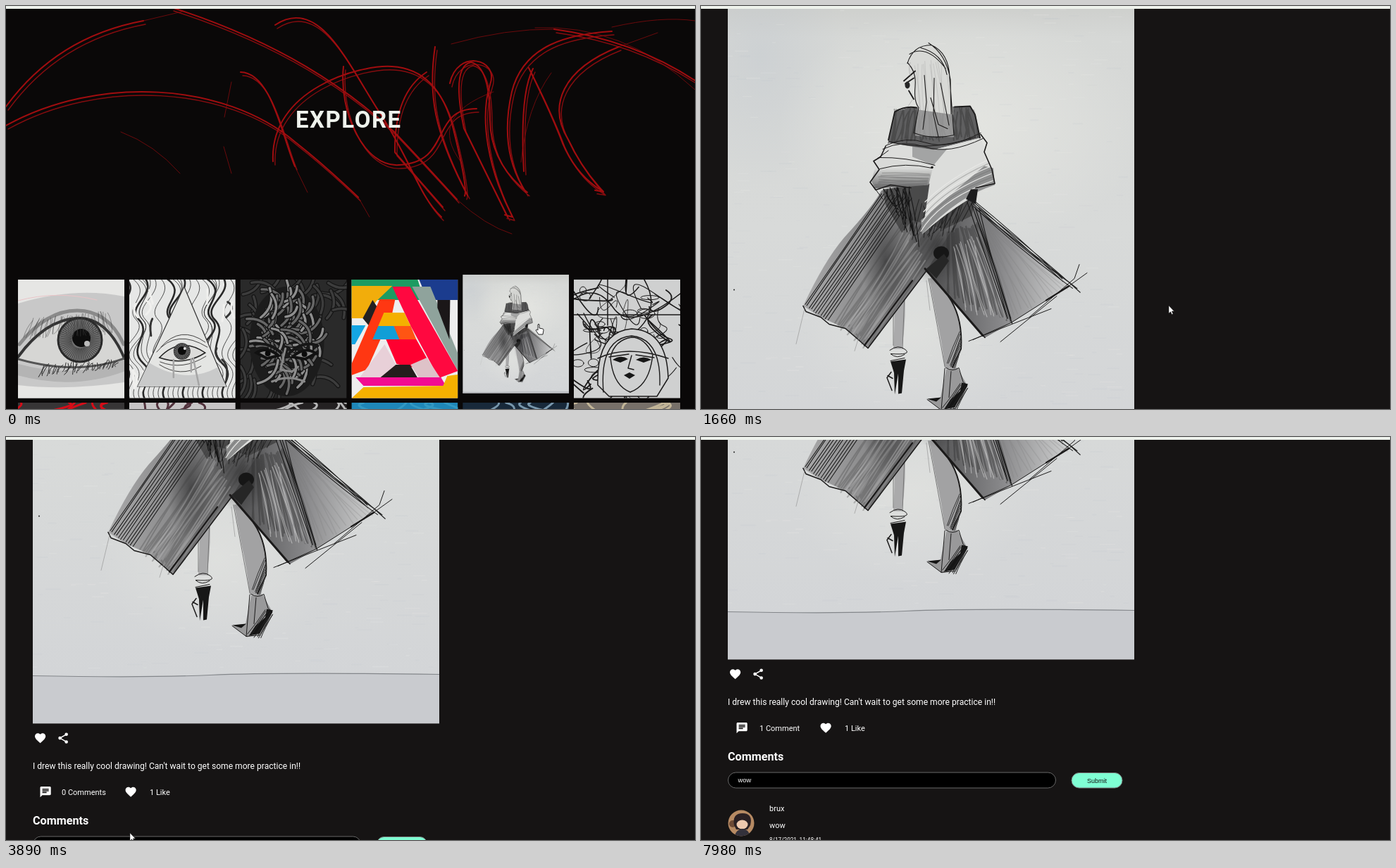
These frames come from a looping animation (978x573 px, 8.11 s). An HTML page:

```html
<!DOCTYPE html>
<html lang="en">
<head>
<meta charset="utf-8">
<title>Art community</title>
<style>
  html, body { margin: 0; width: 100%; height: 100%; overflow: hidden; background: #161414; }
  #stage { display: block; width: 978px; height: 573px; font: 11px Roboto, sans-serif; fill: #fff; }
  .line { fill: none; stroke: #1b1a1a; stroke-linecap: round; stroke-linejoin: round; }
  .field { fill: #000; stroke: #686868; }
  .arial { font-family: "Liberation Sans", Arial, sans-serif; }
</style>
</head>
<body>
<svg id="stage" viewBox="0 0 978 573">
  <defs>
    <linearGradient id="paper" x2="0" y2="1">
      <stop stop-color="#b5b6b3"/><stop offset=".05" stop-color="#c8c9c6"/>
      <stop offset=".15" stop-color="#d6d8d6"/><stop offset=".5" stop-color="#d8dad9"/>
      <stop offset="1" stop-color="#d2d4d7"/>
    </linearGradient>
    <radialGradient id="glow"><stop stop-color="#e4e5e1"/><stop offset="1" stop-color="#e4e5e1" stop-opacity="0"/></radialGradient>
    <radialGradient id="haze"><stop stop-color="#bcc3cc"/><stop offset="1" stop-color="#bcc3cc" stop-opacity="0"/></radialGradient>
    <radialGradient id="smudge"><stop stop-color="#2c2c2d"/><stop offset="1" stop-color="#2c2c2d" stop-opacity="0"/></radialGradient>
    <linearGradient id="skirt"><stop stop-color="#a9a9aa"/><stop offset=".45" stop-color="#707071"/><stop offset="1" stop-color="#98989a"/></linearGradient>
    <linearGradient id="panel"><stop stop-color="#4c4c4d"/><stop offset=".5" stop-color="#858587"/><stop offset="1" stop-color="#d0d1d1"/></linearGradient>
    <linearGradient id="sleeve" x2="0" y2="1"><stop offset=".3" stop-color="#d9dad8"/><stop offset="1" stop-color="#6f6f70"/></linearGradient>
    <clipPath id="sheet"><rect x="38" y="87" width="577" height="769"/></clipPath>
    <clipPath id="disc"><circle r="18.5"/></clipPath>
    <g id="art" clip-path="url(#sheet)"></g>
    <g id="portrait" clip-path="url(#disc)">
      <path d="M-19-19H19V19H-19z" fill="#b68a63"/>
      <circle cx="-12" cy="1" r="5" fill="#6d4a35"/>
      <path d="M-10 3Q-13-14 2-14T13 3L9 9H-7z" fill="#2a2023"/>
      <ellipse cx="1.5" cy="2" rx="8" ry="6.5" fill="#eec9ae"/>
      <path d="M-8-1Q1-11 11-1L8-7H-5z" fill="#2a2023"/>
      <path d="M-10 19Q-6 8 2 8T13 19z" fill="#33313b"/>
    </g>
    <g id="landscape" clip-path="url(#disc)">
      <path d="M-19-19H19V19H-19z" fill="#1d2a36"/>
      <path d="M-19-9L18-17L12 0L-1 7L-19 4z" fill="#8fa3b3"/>
      <path d="M-19-3L10-10L9 1L-19 6z" fill="#d3dade"/>
      <path d="M-19 5L0 7L19-3V19H-19z" fill="#080909"/>
      <path d="M-1 8L1 0L3 8z" fill="#111"/>
    </g>
    <path id="heart" d="M12 21.35l-1.45-1.32C5.4 15.36 2 12.28 2 8.5 2 5.42 4.42 3 7.5 3c1.74 0 3.41.81 4.5 2.09C13.09 3.81 14.76 3 16.5 3 19.58 3 22 5.42 22 8.5c0 3.78-3.4 6.86-8.55 11.54z"/>
    <path id="chat" d="M20 2H4c-1.1 0-2 .9-2 2v18l4-4h14c1.1 0 2-.9 2-2V4c0-1.1-.9-2-2-2zM6 9h12v2H6zm8 5H6v-2h8zm4-6H6V6h12z"/>
    <g id="share"><path d="M18 5L6 12L18 19" fill="none" stroke="#fff" stroke-width="2"/><circle cx="18" cy="5" r="3"/><circle cx="6" cy="12" r="3"/><circle cx="18" cy="19" r="3"/></g>
    <g id="bubbles"><circle cx="7.2" cy="14.4" r="3.2"/><circle cx="14.8" cy="18" r="2"/><circle cx="15.2" cy="8.8" r="4.8"/></g>
    <path id="compass" fill-rule="evenodd" d="M12 2a10 10 0 100 20a10 10 0 100-20zm2.2 12.2L6 18l3.8-8.2L18 6zM12 10.9a1.1 1.1 0 100 2.2a1.1 1.1 0 100-2.2z"/>
    <path id="school" d="M5 13.18v4L12 21l7-3.82v-4L12 17zM12 3L1 9l11 6 9-4.91V17h2V9z"/>
    <g id="cart"><circle cx="7" cy="20" r="2"/><circle cx="17" cy="20" r="2"/><path d="M1 2v2h2l3.6 7.6-1.4 2.4C4.5 15.5 5.5 17 7 17h12v-2H7.4l1-2h7.2c.7 0 1.4-.4 1.700-1L21 5.500C21.300 4.800 20.800 4 20 4H5.200l-.9-2z"/></g>
    <path id="forum" d="M21 6h-2v9H6v2c0 .55.45 1 1 1h11l4 4V7c0-.55-.45-1-1-1zm-4 6V3c0-.55-.45-1-1-1H3c-.55 0-1 .45-1 1v14l4-4h10c.55 0 1-.45 1-1z"/>
  </defs>

  <g id="explore"></g>

  <g id="post">
    <rect width="978" height="1300" fill="#161414"/>
    <rect y="46" width="978" height="37" fill="#000"/>
    <circle cx="29.5" cy="23.5" r="9" fill="#7fffd4"/>
    <rect class="field" x="63" y="14.5" width="404" height="21.5" rx="10.75"/>
    <text x="83" y="28.5" font-size="10.2" fill="#7d7d7d">Search Image Posts...</text>
    <use href="#portrait" transform="translate(761.5 25) scale(.56)"/>
    <text x="777" y="29">Profile</text>
    <text x="878" y="28">Sign out</text>
    <g id="nav"></g>
    <g id="body">
      <use href="#landscape" transform="translate(57 121) scale(1 .92)"/>
      <text x="88" y="115">TolSketch5081</text>
      <text x="38" y="173.5" font-size="12.2">Wandering Shadow</text>
      <use href="#art" y="112.5"/>
      <g id="like" transform="translate(39.5 980) scale(.76)"><use href="#heart"/></g>
      <use href="#share" transform="translate(72 980) scale(.76)"/>
      <text x="38" y="1033" font-size="12.1">I drew this really cool drawing! Can't wait to get some more practice in!!</text>
      <g id="comments"><use href="#chat" transform="translate(-9 -9) scale(.76)"/><text y="4"></text></g>
      <g id="likes"><use href="#heart" transform="translate(-9 -9) scale(.76)"/><text y="4"></text></g>
      <text x="38" y="1112" font-size="16.2" font-weight="700">Comments</text>
      <rect class="field" x="38.5" y="1129" width="465" height="22" rx="11"/>
      <text class="arial" x="52.5" y="1143" font-size="9.3">wow</text>
      <rect id="caret" x="71" y="1134" width="1" height="11"/>
      <rect x="526" y="1129.5" width="72" height="21.5" rx="10.75" fill="#7fffd4" stroke="#777"/>
      <text class="arial" x="548" y="1143.5" font-size="9" fill="#111">Submit</text>
      <use href="#portrait" transform="translate(57 1201)"/>
      <text x="97" y="1184">brux</text>
      <text x="97" y="1207.5">wow</text>
      <text x="97" y="1228" font-size="8.2">8/17/2021, 11:48:41</text>
    </g>
  </g>

  <rect width="978" height="4" fill="#eef2ec"/>
  <path id="arrow" d="M0 0V11L2.6 8.7L4.3 12.5L6 11.7L4.3 8H7.5z" stroke="#222" stroke-width=".5"/>
  <path id="hand" d="M-2 1Q-1-1 0 1V6L5 7Q6 7 6 9L5 15H-1L-5 9Q-4 7-2 9z" stroke="#111" stroke-width=".9"/>
</svg>
<script>
const LOOP = 8110;
const $ = id => document.getElementById(id);
let seed = 7;
const rand = () => (seed = seed * 16807 % 2147483647) / 2147483647;
const spread = (low, high) => low + (high - low) * rand();
const many = (n, make) => Array.from({ length: n }, (_, i) => make(i, n > 1 ? i / (n - 1) : 0)).join('');
const fill = (d, color, extra = '') => `<path d="${d}" fill="${color}" ${extra}/>`;
const ink = (d, width = 1, color = '#1b1a1a') => `<path class="line" d="${d}" style="stroke:${color};stroke-width:${width}"/>`;
const oval = (x, y, rx, ry, color, opacity = 1) =>
  `<ellipse cx="${x}" cy="${y}" rx="${rx}" ry="${ry}" fill="${color}" opacity="${opacity}"/>`;

// Strokes running from points on one segment to matching points on another.
function fan([ax, ay, bx, by], [cx, cy, dx, dy], n, color, width = 1, jitter = 2) {
  const wobble = () => spread(-jitter, jitter);
  return ink(many(n, (i, k) => {
    const x1 = ax + (bx - ax) * k + wobble(), y1 = ay + (by - ay) * k + wobble();
    const x2 = cx + (dx - cx) * k + wobble(), y2 = cy + (dy - cy) * k + wobble();
    return `M${x1} ${y1}Q${(x1 + x2) / 2 + wobble() * 2} ${(y1 + y2) / 2 + wobble() * 2} ${x2} ${y2}`;
  }), width, color);
}

function drawing() {
  const paper = fill('M38 87H615V856H38z', 'url(#paper)')
    + fill('M38 87H560Q300 98 38 140z', '#a5a6a2', 'opacity=".3"')
    + oval(85, 230, 120, 190, 'url(#haze)', .35)
    + oval(370, 330, 260, 170, 'url(#glow)')
    + oval(300, 620, 170, 130, 'url(#glow)', .6)
    + many(420, () => ink(`M${spread(30, 600)} ${spread(105, 780)}h${spread(3, 22)}`, spread(.8, 2), rand() < .55 ? '#eeefeb30' : '#bec4ca28'))
    + fill('M38 788Q200 791 290 787T615 786V856H38z', '#c6c9cd', 'opacity=".75"')
    + ink('M38 788Q200 791 290 787T615 786', 1.2, '#83868a')
    + oval(578, 128, 1, 1, '#222') + oval(47, 561, 1, 1, '#222');

  const legs = fill('M289 550Q292 600 285 645H273Q276 590 273 580z', '#aaaaab')
    + fill('M324 545L351 536Q354 570 362 593Q370 615 367 645L362 673H346Q343 640 334 600z', '#a2a2a3')
    + ink('M289 565L286 645M273 585V640M323 545Q337 620 346 670', 1, '#777')
    + ink('M351 570Q372 600 369 645L357 671', 2) + ink('M358 534L352 572')
    + fan([368, 620, 369, 645], [350, 665, 360, 674], 8, '#333', 1, 1)
    + ink('M268 647Q280 638 290 646T269 652Q278 660 289 653M269 662L289 658')
    + fill('M269 663L291 660L288 676L285 708L280 709V680L275 710L274 679z', '#171717')
    + ink('M270 678L264 686L271 704M265 683L272 687', 1.5)
    + fill('M348 674L364 672L378 697L363 728L342 733L321 717L340 714z', '#99999a')
    + ink('M346 673L341 732L321 717M348 672Q357 678 366 672L372 692L378 697L361 730L341 732M355 677L352 714')
    + fill('M379 695L360 728L345 731L354 717L368 705L370 693zM321 716L341 714L334 720z', '#151515')
    + fan([368, 695, 380, 701], [342, 730, 361, 735], 8, '#222', 1, 2);

  const skirt = fill('M256 420Q246 440 203 487Q175 520 145 584L170 600L205 616L237 644L320 534L403 629L440 608L523 555L390 442L375 412L300 410z', 'url(#skirt)')
    + fill('M380 437L523 555L440 608L403 629L320 534z', 'url(#panel)')
    + oval(262, 520, 34, 75, 'url(#smudge)', .65) + oval(335, 500, 45, 55, 'url(#smudge)', .7)
    + fill('M258 418L324 410L390 430L384 456L345 475L300 462L285 480L262 440z', '#3c3c3d', 'opacity=".75"')
    + fan([256, 425, 300, 430], [147, 582, 180, 604], 11, '#1e1e1e', 1.1, 1)
    + fan([300, 450, 340, 485], [195, 608, 238, 640], 24, '#3a3a3b48', 2, 6)
    + fan([290, 480, 318, 520], [205, 612, 240, 633], 12, '#d5d5d540', 2, 5)
    + fan([350, 480, 392, 470], [350, 565, 440, 605], 24, '#29292a60', 2.4, 4)
    + fan([358, 500, 390, 488], [372, 588, 430, 602], 12, '#e4e4e480', 1.2, 4)
    + fan([388, 448, 405, 465], [440, 600, 520, 557], 12, '#77777938', 1.5, 4)
    + fan([378, 436, 394, 446], [436, 600, 440, 607], 5, '#1f1f1f', 1.2, 2)
    + fan([383, 434, 392, 446], [510, 547, 540, 564], 6, '#222', 1.1, 3)
    + fan([262, 416, 300, 414], [275, 440, 305, 495], 18, '#161616', 1.1, 5)
    + fan([310, 440, 390, 425], [305, 490, 365, 470], 24, '#161616aa', 1.1, 7)
    + oval(341, 509, 11, 10, '#161616') + fill('M320 531L345 510L352 520L334 545z', '#262626')
    + ink('M145 584L149 592L170 600L182 610L205 616L220 629L237 644L320 534L403 629', 1.6)
    + ink('M318 531L400 626', 3)
    + ink('M386 632L440 608L523 555L548 537M380 634L497 588M466 600L530 545L537 525M425 635L505 570M492 575L520 556', 1)
    + ink('M490 576L522 556M232 640L300 548', 2.2)
    + ink('M147 588L135 638M225 625L218 648M320 548L325 590', .7, '#999');

  const top = fill('M275 308L295 302L382 300L389 312L396 345L330 362L265 354z', '#5f5f60')
    + fan([278, 308, 386, 304], [268, 350, 394, 343], 40, '#2525265a', 2, 4)
    + fill('M308 298H357L359 344L304 342z', '#b9b9b8', 'opacity=".65"')
    + fill('M267 352L246 376L251 391L240 408L248 419L325 406L314 482Q360 440 417 412L404 365L397 345L330 362z', '#dcdddb')
    + fill('M250 376Q280 374 329 388L323 412L298 414L247 417L242 407z', 'url(#sleeve)')
    + fill('M415 388L417 412Q365 428 314 482L312 462Q355 425 402 385z', '#8f9090')
    + fill('M300 356Q330 364 350 360L330 384L300 372z', '#6d6d6e', 'opacity=".5"')
    + fan([256, 395, 248, 414], [324, 398, 318, 411], 9, '#4e4e4f50', 1.6, 2)
    + many(7, i => ink(`M${312 + i} ${478 - i * 7}Q${340 + i * 2} ${432 - i * 5} ${414 - i} ${406 - i * 5}`, 1.2, i % 2 ? '#60616160' : '#e8e8e6'))
    + fill('M383 418L393 418L390 439L376 432z', '#1c1c1d')
    + ink('M275 308Q290 299 306 302M275 308L266 348M360 301L382 300L389 312L396 345', 1.8)
    + ink('M262 356Q290 342 320 352T397 338M258 361Q286 347 319 358T400 346M267 350Q320 366 390 344')
    + ink('M262 357L255 372L245 378L253 390L240 408L248 419L269 412L298 416M397 340L406 352L402 365L413 390L417 410L390 416', 1.6)
    + ink('M252 373Q290 372 332 384M254 389Q290 379 328 388M247 377L266 363M240 408L258 432')
    + oval(328, 387, 1.8, 1.8, '#1b1a1a');

  const head = fill('M294 239Q305 214 328 214Q350 223 354 260L358 312L309 305Z', '#d8d9d6')
    + fan([304, 240, 345, 235], [311, 342, 357, 340], 12, '#9a9a9a50', 1, 3)
    + ink('M293 239Q301 213 327 213Q352 224 353 260L359 341M293 238Q306 251 304 272T309 302L302 338M296 226Q320 211 347 246M323 210Q348 226 354 262L355 311M312 217Q343 225 349 255M317 256L320 294L315 333M331 260L330 312L337 344M340 267L352 327M326 288L337 326L350 332M302 338Q330 348 359 341', 1.1)
    + ink('M288 264L304 250M290 268L302 260M295 278L302 290', 1.8)
    + oval(293, 270, 3.5, 5, '#262626')
    + ink('M297 238Q294 247 297 256M300 291L294 300', .7, '#aaa');

  return paper + legs + skirt + top + head;
}

const tile = (x, y, content, box = '0 0 151 168.5') =>
  `<svg x="${x}" y="${y}" width="151" height="168.5" viewBox="${box}" preserveAspectRatio="xMidYMid slice">${content}</svg>`;
const ground = color => fill('M0 0H151V169H0z', color);
const spokes = (x, y, inner, outer, n, color) => ink(many(n, i => {
  const a = i / n * Math.PI * 2, c = Math.cos(a), s = Math.sin(a);
  return `M${x + c * inner} ${y + s * inner}L${x + c * outer} ${y + s * outer}`;
}), .7, color);

const pencilEye = () => ground('#c8c8c8') + fill('M0 0H151V24Q80 10 0 34zM0 150Q70 158 151 146V169H0z', '#e6e6e4')
  + ink('M0 30Q55 15 112 29', 1, '#e9c4c7')
  + ink('M0 128Q80 150 151 122', 16, '#b4b4b4')
  + fill('M0 114Q20 87 45 68Q85 45 117 64Q140 83 151 112Q90 132 0 114z', '#d6d6d4')
  + ink('M2 92Q40 44 84 44T150 92', 5, '#8a8a8a') + ink('M0 110Q38 58 82 55T151 112', 4, '#343434')
  + '<circle cx="88" cy="86" r="31" fill="#747474" stroke="#292929" stroke-width="3"/>' + spokes(88, 86, 12, 29, 60, '#292929')
  + oval(90, 83, 13, 13, '#0d0d0d') + oval(98, 91, 4, 4, '#bbb')
  + fan([8, 82, 135, 75], [20, 58, 128, 47], 40, '#4448', .9, 3) + ink('M0 113Q85 137 151 112', 3, '#555')
  + fan([36, 122, 145, 116], [30, 137, 140, 125], 33, '#2c2c2c', 1, 3);

const triangleEye = () => ground('#e6e7e6')
  + many(24, i => {
    const x = i * 7 - 8, sway = 14 * Math.sin(i * .9);
    return ink(`M${x} -5c${30 + sway} 24-${20 - sway} 42 ${sway} 62s-${24 + sway} 40 ${-sway} 62-14 34 6 56`, i % 4 ? .8 : 2.6, '#292929');
  })
  + many(16, i => ink(`M${i % 2 ? spread(0, 35) : spread(110, 150)} ${spread(0, 130)}q${spread(-14, 14)} 8 ${spread(-6, 6)} ${spread(15, 30)}`, 3, rand() < .5 ? '#333' : '#f0f0ee'))
  + fill('M78 10L12 152H138z', '#e4e5e3', 'stroke="#333" stroke-width="1.2"')
  + fill('M28 118L12 152H138L125 125Q80 150 28 118z', '#c9caca')
  + fill('M43 111Q72 80 108 104Q79 123 43 111z', '#dcdcda', 'stroke="#222" stroke-width="1.5"')
  + oval(75, 102, 12, 12, '#3a3a3a') + spokes(75, 102, 6, 11, 24, '#888') + oval(75, 101, 6, 6, '#0b0b0b') + oval(79, 98, 2, 2, '#ddd')
  + ink('M39 103Q67 69 111 96M45 96Q73 64 108 89M44 117Q76 130 109 109M43 121Q73 140 102 123', .8)
  + ink('M63 114V139M91 112L99 150M88 113V131', 2.5, '#a5a5a5');

const strand = (x, y, reach, color) => {
  const a = spread(0, Math.PI), dx = reach * Math.cos(a), dy = reach * Math.sin(a);
  const d = `M${x - dx} ${y - dy}Q${x + dy * .7} ${y - dx * .7} ${x + dx} ${y + dy}`;
  return ink(d, 6, '#151515') + ink(d, 3.4, color);
};
const wovenFace = () => ground('#2a2a2a')
  + many(45, () => strand(spread(0, 151), spread(0, 169), 20, '#3c3c3c'))
  + oval(66, 88, 53, 78, '#1c1c1c')
  + many(80, i => {
    const a = i * 2.4, r = Math.sqrt(rand());
    return strand(66 + 44 * r * Math.cos(a), 80 + 66 * r * Math.sin(a), spread(10, 22), i % 3 ? '#666' : '#8e8e8e');
  })
  + fill('M23 104Q38 94 54 108L38 112zM74 110Q92 94 107 105L92 113z', '#8a8a8a', 'stroke="#111" stroke-width="4"')
  + oval(39, 105, 4, 4, '#0b0b0b') + oval(91, 106, 4, 4, '#0b0b0b')
  + ink('M20 92Q40 88 58 104M70 104Q90 86 110 94', 4, '#171717')
  + ink('M64 98L57 128L73 131L82 124M45 145Q68 135 91 145', 3, '#888');

const colorBlocks = () => ground('#eee')
  + fill('M0 0H94L103 29H0z', '#1d9b62') + fill('M0 9H58L35 31L20 55H0z', '#f2ad0b')
  + fill('M96 0H151V29H108z', '#1b3c8e') + fill('M86 10H112L151 105V130z', '#8fa39c')
  + fill('M122 29H140L139 85L122 40z', '#1b1718')
  + fill('M0 65H20L5 92H0z', '#14a5e3') + fill('M30 29L43 49L31 73L16 55z', '#242122')
  + fill('M40 28H62L58 47L22 128L0 136V120z', '#ff3712') + fill('M58 10H83L151 130L124 140L84 66z', '#ff0840')
  + fill('M46 47H75L84 66H38z', '#f4b000') + fill('M38 66H84L76 85H30z', '#119ed7')
  + fill('M60 66H84L92 85H68z', '#ff5513')
  + fill('M49 85H92L110 117L98 127L64 120z', '#ff0030') + fill('M52 121H83L94 140H39z', '#241d1d')
  + fill('M84 121L107 111L126 140H96z', '#dec2c8') + fill('M47 92L63 121L40 140L11 140z', '#e8d0d8')
  + fill('M6 139H127L134 151H17z', '#f20c91') + fill('M17 153L130 151L136 137L151 135V169H0z', '#f5b100');

const lineFace = () => ground('#cfd0d0')
  + many(44, () => ink(`M${spread(0, 150)} ${spread(0, 165)}q${spread(-25, 25)} ${spread(5, 30)} ${spread(-40, 40)} ${spread(-20, 35)}t${spread(-20, 20)} ${spread(-25, 25)}`, spread(.7, 2)))
  + many(22, () => `<ellipse class="line" cx="${spread(5, 145)}" cy="${spread(0, 160)}" rx="${spread(4, 14)}" ry="${spread(2, 8)}"/>`)
  + ink('M48 0V65M0 50H151M100 0Q126 45 83 78M0 28Q32 5 56 40T151 20', 1.5)
  + fill('M34 150Q32 74 82 70Q132 72 134 140L118 166H50z', '#cfd0d0', 'stroke="#1b1a1a" stroke-width="1.500"')
  + ink('M42 160Q36 84 82 80Q124 84 122 150M52 110Q55 150 80 160Q108 150 112 106Q100 82 82 82Q58 86 52 110M50 110L78 106M88 107L114 111M82 108L77 126L85 128M34 112Q75 92 134 112', 1.4)
  + fill('M55 114Q67 106 77 113L66 118zM88 114Q99 107 110 114L99 118zM71 136L79 132L87 136L79 141z', '#171717');

const secondRow = ['#373536', '#c7c5c6', '#242122', '#1f87b8', '#18293a', '#777069'];
const accents = ['#d50d18', '#51323c', '#b6b6b6', '#3399c3', '#7897ac', '#c2b597'];

const scribbles = [
  'M0 143Q72 44 195 21M0 170C130 98 310 108 410 193Q452 226 500 272',
  'M235 2C390 52 483 117 550 178Q590 220 640 275',
  'M382 27C445-15 485 82 530 151S586 270 618 300',
  'M333 94C376 95 391 181 410 228',
  'M379 221C374 118 503 83 548 86Q614 90 635 175T651 270',
  'M479 86C472 150 508 230 558 226C634 222 601 146 668 146',
  'M609 58C599 125 607 178 655 269M597 94Q551 124 552 208L620 286',
  'M630 110C640 61 701 74 687 112C672 160 684 232 719 300L708 297',
  'M740 265Q688 224 687 162Q687 86 660 80Q632 86 650 174L712 300',
  'M742 88Q775 155 790 195Q810 242 848 264L836 262M748 89Q729 126 735 235',
  'M738 265Q699 205 718 122C735 54 800 40 860 36M778 33Q890 48 978 106',
  'M870 58C789 90 769 142 798 190Q817 231 848 264'
].join('');
const faintScribbles = 'M195 21L250 8M500 272L516 300M640 275Q680 312 718 324M410 228L428 265M320 108L310 158'
  + 'M163 179Q211 197 247 238M309 200L320 238M774 95Q739 143 731 222M632 54Q710 32 778 33M860 30Q930 14 978 21'
  + 'M870 58L925 38M751 31Q877 25 978 119M692 122Q597 157 646 222';

function buildExplore() {
  const pictures = [pencilEye, triangleEye, wovenFace, colorBlocks, null, lineFace];
  const columnX = i => 17 + i * 157.8;
  return '<rect width="978" height="573" fill="#0a0808"/>'
    + ink(faintScribbles, 1, '#6a0a0c')
    + `<g transform="translate(3 5)">${ink(scribbles, 1.4, '#850c0f')}</g>` + ink(scribbles, 2, '#a00d0f')
    + '<text x="411" y="173" font-size="33" font-weight="700" letter-spacing="1.5" fill="#eef2ec">EXPLORE</text>'
    + pictures.map((make, i) => make
      ? tile(columnX(i), 389, make())
      : tile(columnX(i), 382, '<use href="#art"/>', '38 87 577 769')).join('')
    + secondRow.map((color, i) => tile(columnX(i), 564, ground(color)
      + many(7, () => ink(`M${spread(0, 151)} 0q${spread(-20, 20)} 4 ${spread(-30, 30)} 12`, 3, accents[i])))).join('');
}

const menu = [['bubbles', 115, 126, 'ABOUT'], ['compass', 267, 278.5, 'EXPLORE'], ['school', 431, 442, 'LEARNING'],
  ['cart', 599.5, 611, 'MARKETPLACE'], ['forum', 793, 804.5, 'COMMUNITY']];
$('nav').innerHTML = menu.map(([icon, iconX, textX, label]) =>
  `<use href="#${icon}" transform="translate(${iconX - 9} 54.5) scale(.76)"/><text x="${textX}" y="66">${label}</text>`).join('')
  + [204, 367, 536.5, 730].map(x => `<rect x="${x}" y="57" width="1.8" height="12"/>`).join('');
$('art').innerHTML = drawing();
$('explore').innerHTML = buildExplore();

const scrollTrack = [[0, 0], [1120, 32], [1240, 112.5], [1360, 235], [1510, 270], [1810, 405], [1930, 557], [2050, 561],
  [6360, 605], [6510, 644], [6630, 652]];
const cursorTrack = [[0, 'hand', 757, 452], [130, 'arrow', 755, 452], [840, 'arrow', 708, 438], [970, 'arrow', 675, 427], [1360],
  [1660, 'arrow', 664, 426], [2200, 'arrow', 610, 433], [2320, 'arrow', 490, 441], [2440, 'arrow', 340, 442],
  [2560, 'arrow', 190, 438], [2680, 'arrow', 92, 432], [2800, 'hand', 51, 428], [3350, 'arrow', 164, 477],
  [3490, 'arrow', 172, 535], [3620, 'arrow', 174, 555], [3760, 'arrow', 175, 560], [3890, 'arrow', 176, 563],
  [4130, 'arrow', 177, 565], [4370, 'arrow', 178, 567], [4520, 'arrow', 178, 570], [4640],
  [6060, 'arrow', 288, 461], [6200, 'arrow', 353, 369], [7310, 'arrow', 434, 395], [7460, 'arrow', 781, 474],
  [7600, 'arrow', 956, 534], [7730]];
const caretTrack = [[0, false], [6510, true], [7030, false], [7600, true], [7980, false]];
const latest = (track, t) => track.findLast(key => key[0] <= t);
const show = (id, on) => $(id).setAttribute('display', on ? 'inline' : 'none');

function setStat(id, x, textX, label) {
  $(id).setAttribute('transform', `translate(${x} 1065.5)`);
  const text = $(id).querySelector('text');
  text.setAttribute('x', textX - x);
  text.textContent = label;
}

function render(now) {
  const t = now % LOOP;
  show('explore', t < 290);
  show('post', t >= 290);
  show('body', t >= 420);
  $('post').setAttribute('transform', `translate(0 ${-latest(scrollTrack, t)[1]})`);

  const liked = t >= 3110, like = $('like');
  like.setAttribute('fill', liked ? '#fff' : 'none');
  like.setAttribute('stroke', liked ? 'none' : '#fff');
  like.setAttribute('stroke-width', 2);
  if (t < 5690) setStat('comments', 56, 79, '0 Comments');
  else setStat('comments', 58, 83, '1 Comment');
  if (t < 3240) setStat('likes', 175, 200, '0 Likes');
  else setStat('likes', 177, 204, '1 Like');
  show('caret', latest(caretTrack, t)[1]);

  const [, shape, x, y] = latest(cursorTrack, t);
  for (const id of ['arrow', 'hand']) show(id, id === shape);
  if (shape) $(shape).setAttribute('transform', `translate(${x} ${y})`);
}

const start = performance.now();
function tick() {
  render(performance.now() - start);
  requestAnimationFrame(tick);
}
tick();
</script>
</body>
</html>
```
